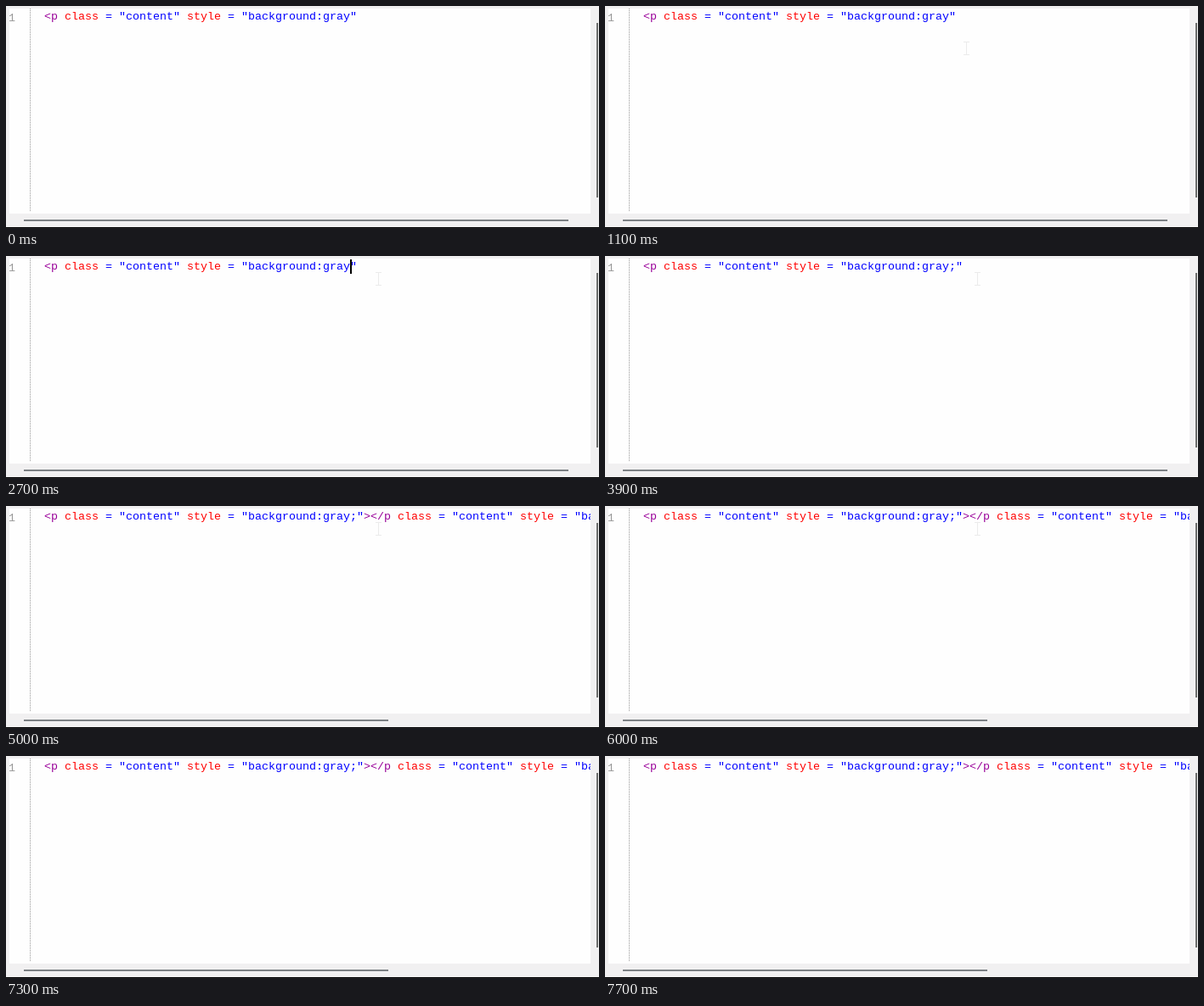
Animation, 698 px wide and 262 px high, one loop 7.8 s. Source, as an HTML page:

```html
<!DOCTYPE html>
<html lang="en">
<head>
<meta charset="utf-8">
<title>Code editor</title>
<style>
html, body { margin: 0; width: 100%; height: 100%; overflow: hidden; }
body { position: relative; background: #f1f0f1; font: 13.333px/16px "Liberation Mono", "Courier New", monospace; }
div { position: absolute; }
#page { left: 4px; top: 3px; width: 684px; height: 242px; background: #fefefe; overflow: hidden; }
#num { left: -1px; top: 4px; color: #999; }
#gutter { left: 24px; top: 0; width: 1px; height: 240px; background: repeating-linear-gradient(#999 0 1px, #fefefe 1px 2px); }
#code { left: 41px; top: 2px; white-space: pre; color: #00f; }
.tag { color: #909; }
.attr { color: #f00; }
#caret { top: 4px; width: 2px; height: 17px; background: #000; }
#pointer { width: 7px; height: 16px; color: #ebebeb; background:
  linear-gradient(currentColor, currentColor) 3px 0 / 1px 16px no-repeat,
  linear-gradient(currentColor, currentColor) 0 0 / 7px 1px no-repeat,
  linear-gradient(currentColor, currentColor) 0 15px / 7px 1px no-repeat; }
#vbar { left: 695px; top: 20px; width: 2px; height: 206px; background: #6b6b6b; }
#hbar { left: 21px; top: 252px; height: 2px; background: #7c8084; }
#foot { left: 0; top: 261px; width: 100%; height: 1px; background: #000; }
</style>
</head>
<body>
<div id="page"><div id="num">1</div><div id="gutter"></div><div id="code"></div></div>
<div id="pointer"></div><div id="caret"></div>
<div id="vbar"></div><div id="hbar"></div><div id="foot"></div>
<script>
const el = id => document.getElementById(id);
const LOOP = 7800, LEFT = 45, CELL = 8;
const span = (kind, text) => `<span class="${kind}">${text}</span>`;
const attrs = value => ` ${span('attr', 'class')} = "content" ${span('attr', 'style')} = "background:${value}"`;
const open = value => span('tag', '&lt;p') + attrs(value);
const plain = open('gray'), ended = open('gray;');
const closed = ended + span('tag', '&gt;&lt;/p') + attrs('gray;') + span('tag', '&gt;');

// Each row: start time, then the value held from there on
const texts = [[0, plain], [3000, ended], [4300, closed]];
const carets = [[0, -1], [600, 46], [1100, -1], [1600, 46], [2100, -1], [2700, 45], [3000, 46],
  [3400, 47], [3900, -1], [4300, 48], [5000, -1], [5500, 48], [6000, -1], [6600, 48],
  [7100, -1], [7600, 48], [7700, -1]];
const pointers = [[0], [400, 464, 101], [900, 443, 72], [1100, 422, 42], [1400],
  [2100, 435, 19], [3400], [3900, 435, 19], [6800]];
const at = (rows, t) => rows.findLast(row => row[0] <= t).slice(1);

let shown;
function draw(now) {
  const t = now % LOOP;
  const [text] = at(texts, t), [column] = at(carets, t), [x, y] = at(pointers, t);
  if (text !== shown) el('code').innerHTML = shown = text;
  const caret = el('caret').style, pointer = el('pointer').style;
  caret.display = column < 0 ? 'none' : 'block';
  caret.left = LEFT + column * CELL + 'px';
  pointer.display = x ? 'block' : 'none';
  pointer.left = x + 'px';
  pointer.top = y + 'px';
  el('hbar').style.width = (t < 4300 ? 641 : 429) + 'px';
}
const start = performance.now();
function tick() {
  draw(performance.now() - start);
  requestAnimationFrame(tick);
}
tick();
</script>
</body>
</html>
```
